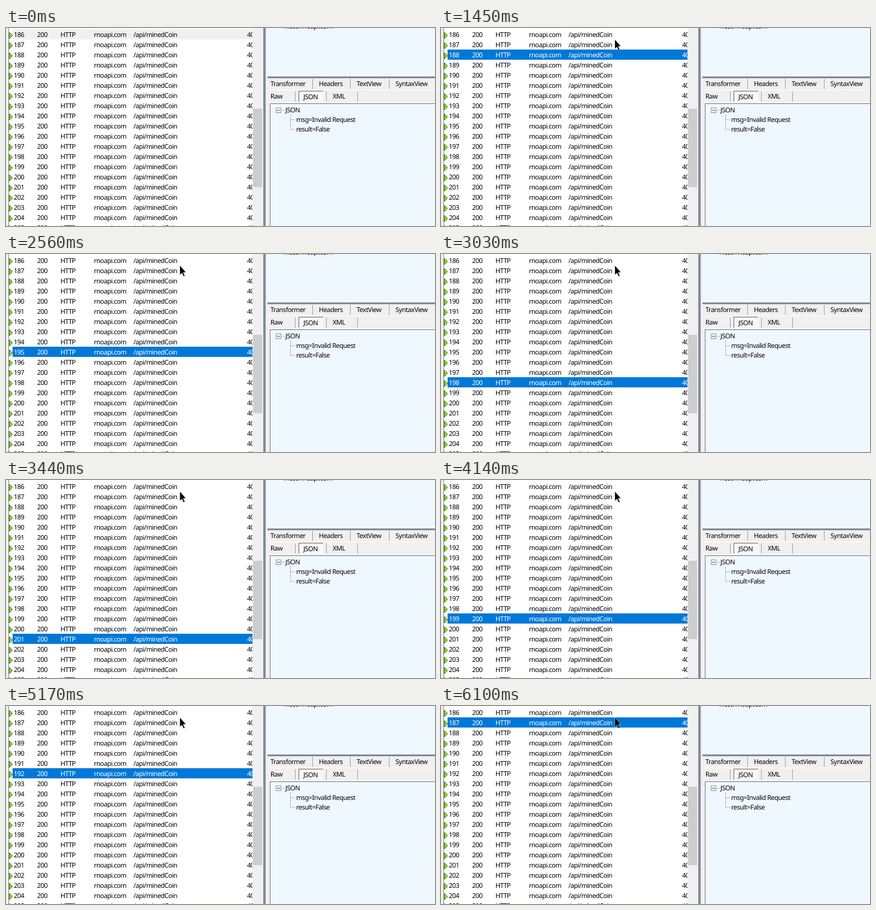
An HTML page that plays this animation: 717x331 px, repeating every 6810 ms.

```html
<!DOCTYPE html>
<html lang="en">
<head>
<meta charset="utf-8">
<title>Request list</title>
<style>
  html, body { margin: 0; width: 100%; height: 100%; overflow: hidden; background: #f0f0f0; }
  svg { display: block; width: 717px; height: 331px; }
  text {
    font: 11px "Noto Sans", "Open Sans", sans-serif;
    letter-spacing: -.5px;
    text-rendering: geometricPrecision;
    white-space: pre;
  }
</style>
</head>
<body>
<svg id="stage" viewBox="0 0 717 331">
  <defs>
    <clipPath id="listClip"><rect x="4" width="408" height="331"/></clipPath>
  </defs>
  <g id="list"></g>
  <g id="panel"></g>
  <path id="cursor" d="M.5 0V16L4 12.8L6.8 18.6L9 17.5L6.3 11.8H10.8Z" stroke="#fff" stroke-width=".5"/>
</svg>
<script>
const LOOP = 6810, FIRST_ID = 186, ROW_TOP = 2, ROW_HEIGHT = 17, LAST_ROW = 19;
const CLICK = 840, ENTER = 70, MOVE_STEP = 77, MOVE_STEPS = 9;
const CURSOR_START = [512, 319], CURSOR_END = [290, 19];

// Times of the arrow-key presses that move the selection.
const downKeys = [1450, 1620, 1780, 1940, 2100, 2250, 2410, 2560, 2730, 2870, 3010, 3150, 3290, 3440, 3590];
const upKeys = [3820, 3970, 4140, 4310, 4450, 4580, 4720, 4850, 5020, 5170, 5340, 5490, 5800, 5950, 6100];

const list = document.getElementById("list");
const panel = document.getElementById("panel");
const cursor = document.getElementById("cursor");

function add(parent, tag, attributes, content = "") {
  const node = document.createElementNS("http://www.w3.org/2000/svg", tag);
  for (const name in attributes) node.setAttribute(name, attributes[name]);
  node.textContent = content;
  return parent.appendChild(node);
}
const box = (parent, x, y, width, height, fill) => add(parent, "rect", { x, y, width, height, fill });
const label = (parent, x, y, content) => add(parent, "text", { x, y }, content);
const dots = d => add(panel, "path", { d, stroke: "#808080", "stroke-dasharray": "1 1", fill: "none" });

// Request list
box(list, 5, 0, 407, 331, "#fff");
box(list, 4, 0, 1, 331, "#828790");
const selection = box(list, 11, ROW_TOP, 401, ROW_HEIGHT, "#f0f0f0");
const rows = [];
const rowLayer = add(list, "g", { "clip-path": "url(#listClip)" });
for (let i = 0; i <= LAST_ROW; i++) {
  const top = ROW_TOP + i * ROW_HEIGHT;
  add(rowLayer, "path", {
    d: `M5.5 ${top + 5}L11 ${top + 10.5}L5.5 ${top + 16}Z`,
    fill: "#8ed02c", stroke: "#3f7d12"
  });
  const row = add(rowLayer, "g", {});
  const cells = [[13, FIRST_ID + i], [52, 200], [91, "HTTP"], [147, "rnoapi.com"], [213, "/api/minedCoin"], [403, "40"]];
  for (const [x, content] of cells) label(row, x, top + 13, content);
  rows.push(row);
}

// Scrollbar and splitter
box(list, 412, 0, 17, 331, "#f0f0f0");
box(list, 413, 135, 15, 131, "#cdcdcd");
box(list, 430, 0, 4, 331, "#7f8b99");

// Inspector
box(panel, 437, 0, 280, 80, "#f0f8ff");
label(panel, 465, 1, "Host: rnoapi.com");
box(panel, 437, 81, 280, 3, "#7f8b99");
for (const y of [103, 124]) box(panel, 437, y, 280, 1, "#fff");
for (const [x, y, content] of [
  [442, 97, "Transformer"], [523, 97, "Headers"], [586, 97, "TextView"], [651, 97, "SyntaxView"],
  [442, 118, "Raw"], [546, 118, "XML"]
]) label(panel, x, y, content);
for (const x of [512, 575, 640]) box(panel, x, 85, 1, 17, "#a0a0a0");
for (const x of [483, 535, 587]) box(panel, x, 106, 1, 17, "#a0a0a0");
box(panel, 489, 105, 41, 18, "#696969");
box(panel, 490, 106, 40, 17, "#f8f8f8");
label(panel, 497, 119, "JSON");

// Response tree
box(panel, 441, 126, 276, 205, "#737b84");
box(panel, 442, 127, 275, 204, "#f0f8ff");
add(panel, "rect", { x: 451.5, y: 133.5, width: 8, height: 8, fill: "#fff", stroke: "#919191" });
box(panel, 453, 137, 5, 1, "#33507f");
dots("M461 137.5H466M475.5 144V169M476 153.5H484M476 169.5H484");
label(panel, 467, 141, "JSON");
label(panel, 485, 157, "msg=Invalid Request");
label(panel, 485, 173, "result=False");

function draw(t) {
  const passed = keys => keys.filter(time => time <= t).length;
  const clicked = t >= CLICK;
  const selected = clicked ? 1 + passed(downKeys) - passed(upKeys) : 0;
  selection.setAttribute("y", ROW_TOP + selected * ROW_HEIGHT);
  selection.setAttribute("fill", clicked ? "#0078d7" : "#f0f0f0");
  rows.forEach((row, i) => row.setAttribute("fill", clicked && i === selected ? "#fff" : "#000"));

  const progress = Math.min(1, Math.max(0, Math.floor((t - ENTER) / MOVE_STEP) / MOVE_STEPS));
  const eased = 1 - (1 - progress) ** 2;
  const [x, y] = CURSOR_START.map((from, k) => Math.round(from + (CURSOR_END[k] - from) * eased));
  cursor.setAttribute("transform", `translate(${x} ${y})`);
  cursor.setAttribute("visibility", t < ENTER ? "hidden" : "visible");
}

const start = performance.now();
function tick() {
  draw((performance.now() - start) % LOOP);
  requestAnimationFrame(tick);
}
tick();
</script>
</body>
</html>
```
